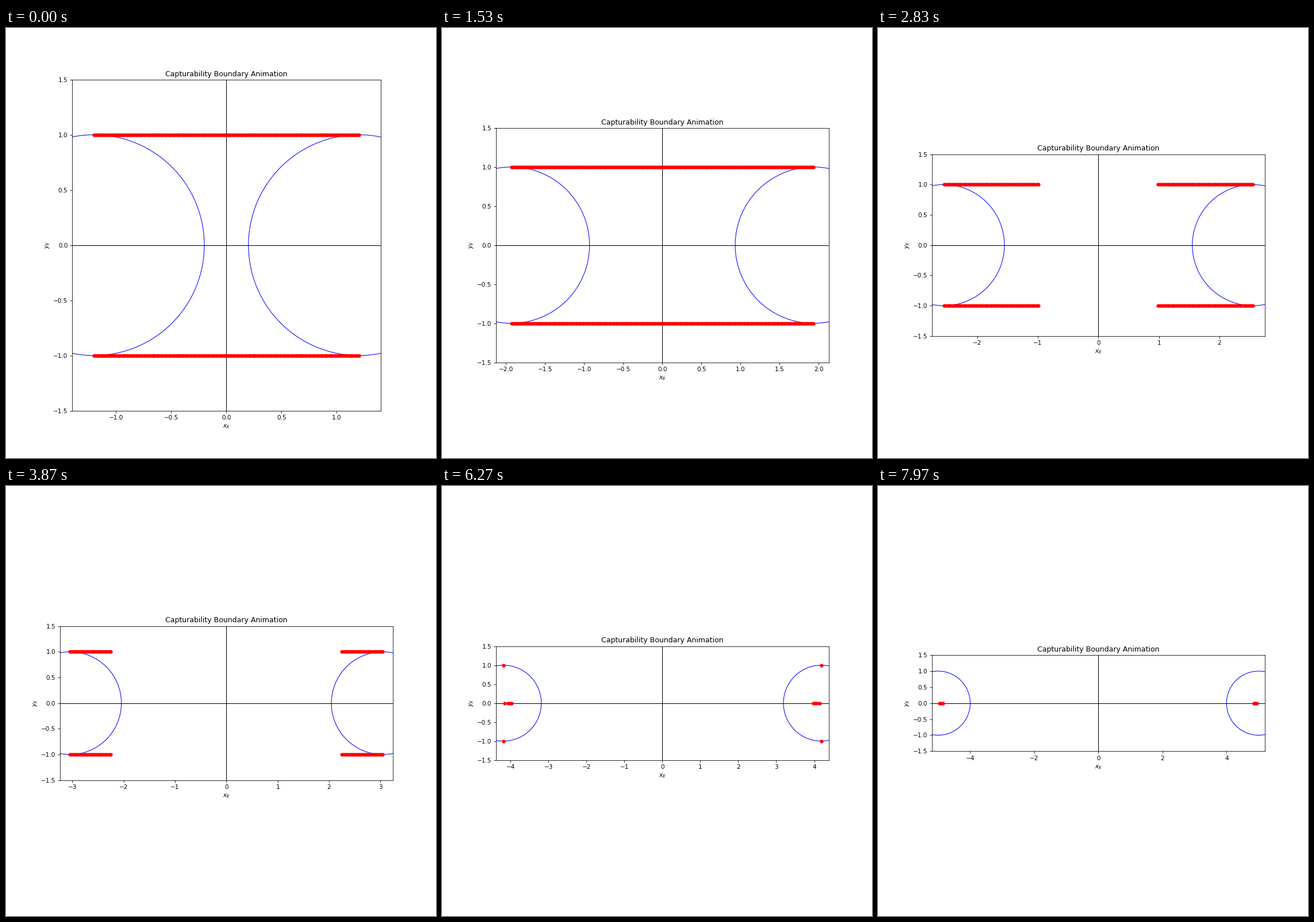
Recreate the animation shown at these times as a matplotlib script. Size 748 px wide and 748 px high, loop 8 s.

```python
import numpy as np
import matplotlib.pyplot as plt
from matplotlib.animation import FuncAnimation

TICKS = 400
TICK_MS = 20
POSES = 240  # 30 poses per second over the 8 s loop
SAMPLES = 200

fig = plt.figure(figsize=(10, 10), dpi=74.8)
ax = fig.add_subplot()
ax.set_title("Capturability Boundary Animation")
ax.set_xlabel("$x_E$")
ax.set_ylabel("$y_E$")
ax.set_ylim(-1.5, 1.5)
ax.set_aspect("equal", adjustable="box")
ax.axhline(0, color="black", linewidth=1)
ax.axvline(0, color="black", linewidth=1)

circles = [plt.Circle((0, 0), 1, color="blue", fill=False, linewidth=1)
           for _ in range(2)]
for circle in circles:
    ax.add_patch(circle)
dots, = ax.plot([], [], "ro", markersize=5)


def boundary(a, pose):
    """Boundary points for pursuers at (-a, 0) and (a, 0)."""
    x = np.linspace(-a, a, SAMPLES)
    index = np.arange(SAMPLES)
    edge = np.minimum(index, SAMPLES - 1 - index)

    outer = 1.475 * a**2 - 8.63
    inner = a**2 - 1.8
    flat = x[x**2 >= outer]

    # Degenerate solutions on the axis, with an occasional miss
    on_axis = (x**2 >= inner) & (x**2 < outer) & (edge > 0)
    on_axis &= (edge + pose) % 19 != 0
    axis = x[on_axis]

    xs = np.concatenate([flat, flat, axis])
    ys = np.concatenate([np.ones_like(flat), -np.ones_like(flat),
                         np.zeros_like(axis)])
    return xs, ys


def update(tick):
    pose = (3 * tick + 2) // 5
    a = 1.2 + 3.8 * pose / (POSES - 1)
    circles[0].center = (-a, 0)
    circles[1].center = (a, 0)
    dots.set_data(*boundary(a, pose))
    ax.set_xlim(-a - 0.2, a + 0.2)
    return [*circles, dots]


anim = FuncAnimation(fig, update, frames=TICKS, interval=TICK_MS,
                     init_func=lambda: update(0), repeat=True, repeat_delay=0,
                     blit=False)
plt.show()
```
